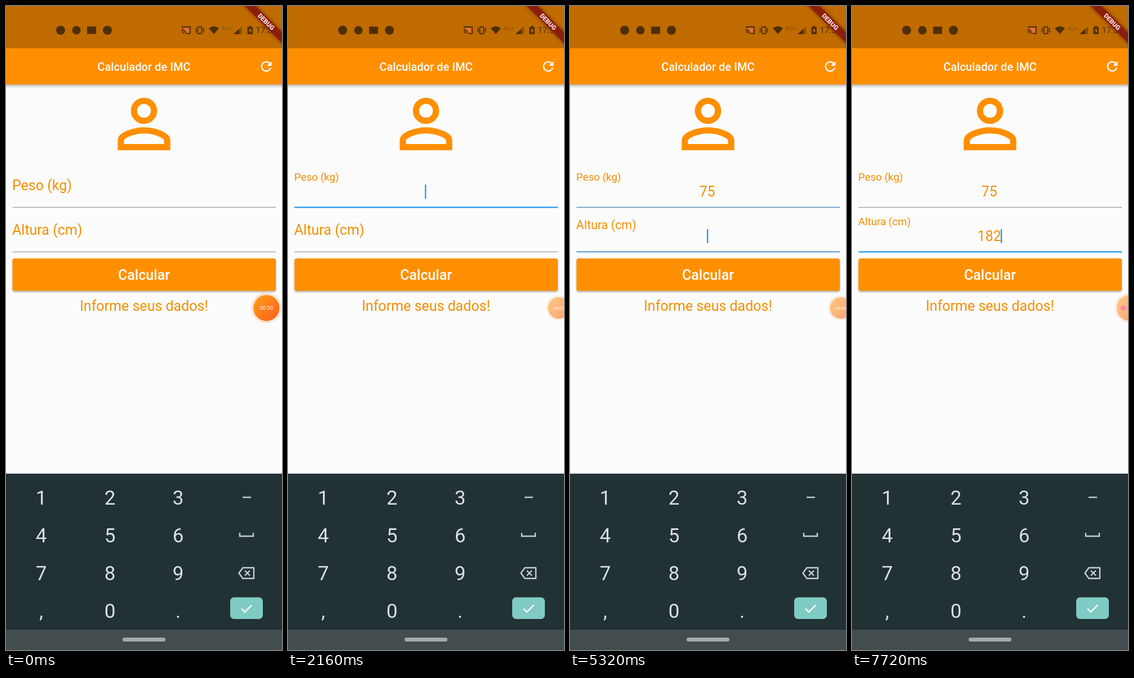
Animation, 490 px wide and 1143 px high, one loop 8 s. Source, as an HTML page:

```html
<!DOCTYPE html>
<html lang="pt">
<head>
<meta charset="utf-8">
<title>Calculador de IMC</title>
<style>
  html, body { margin: 0; width: 100%; height: 100%; overflow: hidden; background: #fcfcfc; }
  svg { display: block; font-family: Roboto, sans-serif; }
  .orange { fill: #f48e02; font-size: 25px; }
  .mid { text-anchor: middle; }
  .medium { fill: #fff; font-weight: 500; }
  .status { fill: #4f2e04; }
  .outline { fill: none; stroke: #4f2e04; stroke-width: 1.8; }
  .keys text { font-size: 35px; fill: #dce0e0; text-anchor: middle; }
  .keyIcon { fill: none; stroke: #c9cfcf; stroke-width: 2.4; }
</style>
</head>
<body>
<svg width="490" height="1143" viewBox="0 0 490 1143">
  <defs>
    <linearGradient id="shade" x2="0" y2="1">
      <stop stop-color="#000" stop-opacity=".26"/>
      <stop offset="1" stop-color="#000" stop-opacity="0"/>
    </linearGradient>
    <linearGradient id="ball" x2="1" y2="1">
      <stop offset=".1" stop-color="#ff9a1c"/>
      <stop offset=".9" stop-color="#fb6217"/>
    </linearGradient>
    <filter id="soft" x="-10%" y="-30%" width="120%" height="170%">
      <feDropShadow dx="0" dy="2" stdDeviation="1.6" flood-opacity=".35"/>
    </filter>
    <filter id="ribbon" x="-20%" y="-80%" width="140%" height="260%">
      <feDropShadow dx="0" dy="0" stdDeviation="3" flood-opacity=".5"/>
    </filter>
  </defs>

  <rect width="490" height="1143" fill="#fcfcfc"/>
  <rect y="139" width="490" height="7" fill="url(#shade)"/>
  <rect y="74" width="490" height="65.3" fill="#ff8f00"/>
  <rect width="490" height="75" fill="#bf6b00"/>

  <!-- status bar -->
  <g class="status">
    <circle cx="97" cy="43" r="8"/>
    <circle cx="125" cy="43" r="7.5"/>
    <rect x="144" y="36.5" width="16" height="13"/>
    <circle cx="180" cy="43" r="8"/>
    <path d="M313 39V37H327V49H321" class="outline"/>
    <path d="M316 40H324.500V46.500H321Q319 42 316 41Z" fill="#ef6a4c"/>
    <path d="M312 42a7 7 0 0 1 7 7M312 45.500a3.500 3.500 0 0 1 3.500 3.500" class="outline" stroke-width="1.5"/>
    <rect x="340.500" y="37" width="7" height="12" rx="1" class="outline"/>
    <path d="M337.500 39v8M350.500 39v8" class="outline"/>
    <path d="M360 39.500Q369 32.500 378 39.500L369 50Z"/>
    <text x="382" y="44" font-size="11" opacity=".4">4G+</text>
    <path d="M404 50L419 36V50Z" opacity=".45"/>
    <path d="M404 50L414 40.700V50Z"/>
    <path d="M428.500 37.500h2.500v-2h4.500v2h2.500V50h-9.500Z"/>
    <path d="M434 38.500L430.500 44.500H433V48.500L436.500 42.500H434Z" fill="#bf6b00"/>
    <text x="443.500" y="48" font-size="15">17:53</text>
  </g>
  <g transform="translate(490 0) rotate(45)">
    <rect x="-60" y="32.700" width="120" height="14" fill="#8c1a12" fill-opacity=".88" filter="url(#ribbon)"/>
    <text class="mid" y="43.800" font-size="11.400" font-weight="900" fill="#f3e6e2">DEBUG</text>
  </g>

  <!-- app -->
  <text class="medium mid" x="245" y="114.500" font-size="20" letter-spacing=".05">Calculador de IMC</text>
  <path transform="translate(448 93.300) scale(1.167)" fill="#fff" d="M17.650 6.350C16.200 4.900 14.210 4 12 4c-4.420 0-7.990 3.580-7.990 8s3.570 8 7.990 8c3.730 0 6.840-2.550 7.730-6h-2.080c-.82 2.330-3.040 4-5.650 4-3.310 0-6-2.690-6-6s2.690-6 6-6c1.660 0 3.140.69 4.220 1.780L13 11h7V4z"/>
  <g transform="translate(175 139.300) scale(5.833)" fill="none" stroke="#ff8f00" stroke-width="1.900">
    <circle cx="12" cy="8" r="3.050"/>
    <path d="M4.950 19.050V17C4.950 15.300 9.100 13.950 12 13.950S19.050 15.300 19.050 17V19.050Z"/>
  </g>
  <g id="fields"></g>
  <rect x="11.500" y="448" width="467.500" height="57.500" rx="4" fill="#ff8f00" filter="url(#soft)"/>
  <text class="medium mid" x="245" y="486.300" font-size="25">Calcular</text>
  <text class="orange mid" x="245" y="541">Informe seus dados!</text>
  <rect id="cursor" width="2.300" height="25" fill="#2196f3"/>

  <!-- keyboard -->
  <rect y="830" width="490" height="277" fill="#223134"/>
  <rect id="press" width="121.500" height="67" fill="#3a484a"/>
  <g id="keys" class="keys"></g>
  <path class="keyIcon" stroke-width="3" d="M420 872H435"/>
  <path class="keyIcon" d="M415 935V941H439V935"/>
  <path class="keyIcon" stroke-linejoin="round" d="M420.500 997H440V1016H420.500L413.500 1006.500ZM424 1002l9 9m0-9l-9 9"/>
  <rect x="398" y="1049.500" width="58" height="38.500" rx="7" fill="#80cbc4"/>
  <path d="M418 1069.500l6 6 12.500-12.500" fill="none" stroke="#fff" stroke-width="2.400"/>
  <rect y="1107" width="490" height="36" fill="#434d4f"/>
  <rect x="207" y="1121" width="76" height="7" rx="3.500" fill="#a4aaab"/>

  <!-- recorder bubble -->
  <g id="bubble">
    <circle r="27.500" fill="#f7a064" opacity=".22"/>
    <circle r="25" fill="#f7a064" opacity=".15"/>
    <circle r="23" fill="url(#ball)"/>
    <text id="clock" class="mid" y="3.300" font-size="9.300" fill="#fff"></text>
    <circle id="dot" cx="-11.500" r="4.600" fill="#ff2f62"/>
  </g>
</svg>

<script>
const LOOP = 8000;
const $ = id => document.getElementById(id);
const set = (el, attrs) => { for (const k in attrs) el.setAttribute(k, attrs[k]); return el; };
const add = (parent, tag, attrs, text = '') => {
  const el = set(document.createElementNS('http://www.w3.org/2000/svg', tag), attrs);
  el.textContent = text;
  return parent.appendChild(el);
};
const ramp = (t, from, to) => Math.min(1, Math.max(0, (t - from) / (to - from)));
const mix = (a, b, k) => a + (b - a) * k;
const easeOut = k => 1 - (1 - k) ** 3;

// cubic-bezier(.4, 0, .2, 1)
function standard(x) {
  let lo = 0, hi = 1, u = x;
  for (let i = 0; i < 20; i++) {
    u = (lo + hi) / 2;
    const bx = 1.2 * u * (1 - u) ** 2 + 0.6 * u * u * (1 - u) + u ** 3;
    if (bx < x) lo = u; else hi = u;
  }
  return u * u * (3 - 2 * u);
}

const KEY_X = [62, 184, 305], KEY_Y = [885, 952, 1019, 1086];
[...'123456789,0.'].forEach((c, i) =>
  add($('keys'), 'text', { x: KEY_X[i % 3] + .5, y: KEY_Y[i / 3 | 0] }, c));

function makeField(label, top) {
  return {
    top,
    line: add($('fields'), 'path', { d: `M11.5 ${top + 57.3}H479` }),
    label: add($('fields'), 'text', { class: 'orange' }, label),
    value: add($('fields'), 'text', { class: 'orange mid', x: 243.7, y: top + 38 }),
  };
}
const weight = makeField('Peso (kg)', 300);
const height = makeField('Altura (cm)', 379);

const FOCUS = [1960, 5245];
// key, pressed, released, digit shown
const TAPS = [
  [7, 3960, 4080, 4080], [5, 4200, 4280, 4360],
  [1, 6000, 6080, 6080], [8, 6360, 6440, 6480], [2, 6640, 6720, 6760],
];
const CURSOR_ON = [[1960, 2440], [2920, 3440], [3960, 4880], [5240, 5720], [6080, 7240], [7720, LOOP]];
const TICKS = [1000, 1720, 2640, 3680, 4720];

function drawField(f, raised, focus, text) {
  const size = mix(1, .75, raised);
  set(f.label, { transform: `translate(11 ${f.top + mix(27, 9.7, raised)}) scale(${size})` });
  const rgb = [[160, 33], [156, 150], [162, 243]].map(([a, b]) => Math.round(mix(a, b, focus)));
  set(f.line, { stroke: `rgb(${rgb})`, 'stroke-width': mix(1.3, 2.3, focus) });
  f.value.textContent = text;
}

function draw(t) {
  const first = standard(ramp(t, FOCUS[0], FOCUS[0] + 200));
  const second = standard(ramp(t, FOCUS[1], FOCUS[1] + 200));
  const typed = taps => taps.filter(k => t >= k[3]).map(k => k[0]).join('');
  const kg = typed(TAPS.slice(0, 2)), cm = typed(TAPS.slice(2));
  drawField(weight, first, first - second, kg);
  drawField(height, second, second, cm);

  const inSecond = t >= 5240;
  set($('cursor'), {
    x: 243 + 7.02 * (inSecond ? cm : kg).length,
    y: (inSecond ? height : weight).top + 17,
    visibility: CURSOR_ON.some(([a, b]) => t >= a && t < b) ? 'visible' : 'hidden',
  });

  const tap = TAPS.find(k => t >= k[1] && t < k[2]);
  if (tap) {
    const i = tap[0] - 1;
    set($('press'), { x: 2 + 121.5 * (i % 3), y: 838 + 67 * (i / 3 | 0) });
  }
  set($('press'), { visibility: tap ? 'visible' : 'hidden' });

  const dock = easeOut(ramp(t, 1480, 2080)), hide = ramp(t, 5340, 5480);
  const x = mix(462.3, 480.7, dock) + 12.3 * hide;
  const scale = mix(1, .83, dock) + .17 * hide;
  set($('bubble'), {
    transform: `translate(${x} 536) scale(${scale})`,
    opacity: mix(1, .56, ramp(t, 1480, 1660)),
  });
  $('clock').textContent = '00:0' + TICKS.filter(s => t >= s).length;
  set($('clock'), { visibility: hide < .5 ? 'visible' : 'hidden' });
  set($('dot'), { visibility: hide < .5 ? 'hidden' : 'visible' });
}

const start = performance.now();
function frame() {
  draw((performance.now() - start) % LOOP);
  requestAnimationFrame(frame);
}
frame();
</script>
</body>
</html>
```
